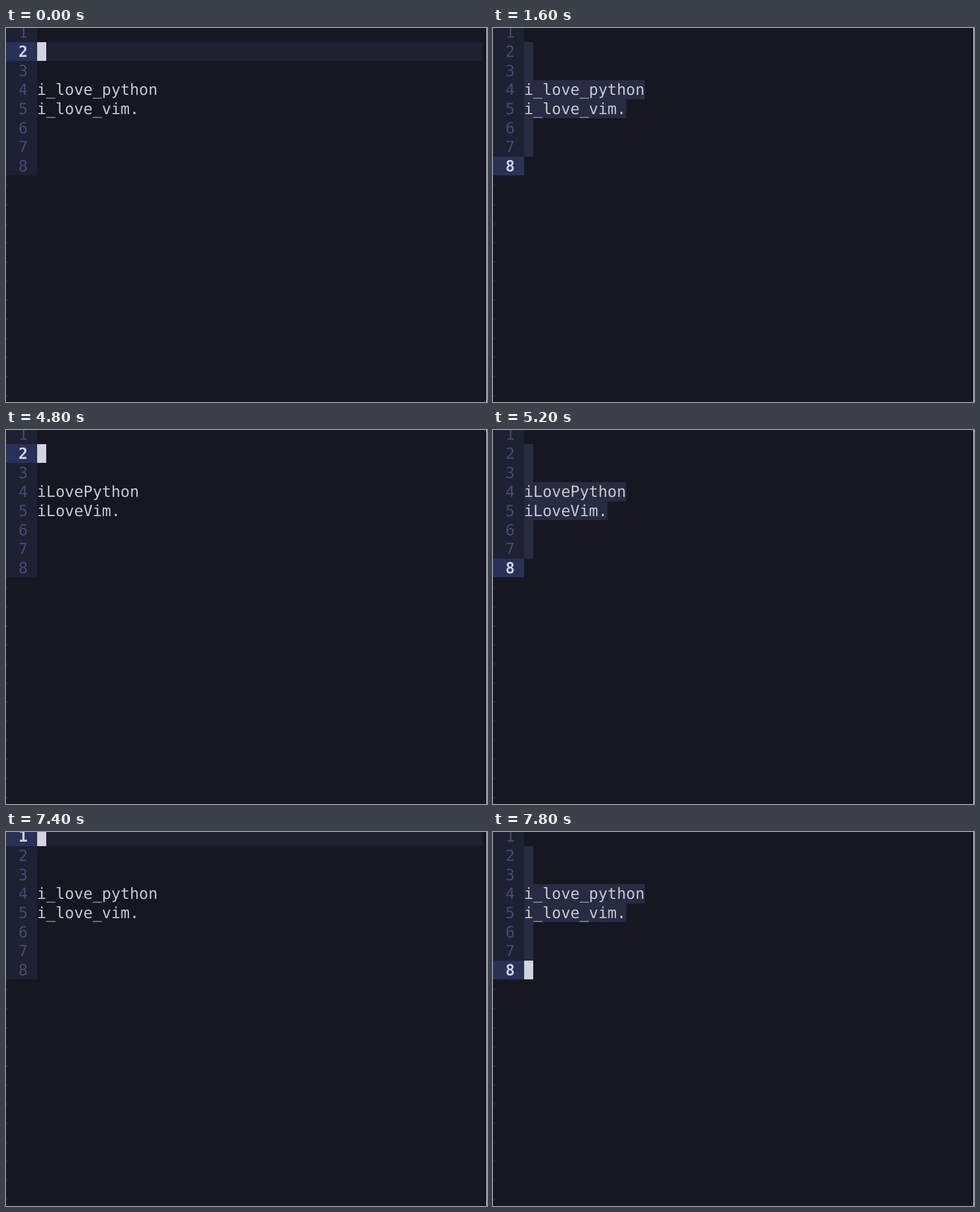
These frames come from a looping animation (849 px wide and 660 px high, 8 s). An HTML page with a canvas:

```html
<!DOCTYPE html>
<html lang="en">
<head>
<meta charset="utf-8">
<title>Editor case toggle</title>
<style>
  html, body { margin: 0; width: 100%; height: 100%; overflow: hidden; background: #161821; }
  canvas { display: block; }
</style>
</head>
<body>
<canvas id="stage" width="849" height="660"></canvas>
<script>
const ctx = document.getElementById('stage').getContext('2d', { alpha: false });
const W = 849, H = 660, LOOP = 8000;
const FONT = '27.2px "DejaVu Sans Mono", monospace';
const LEFT = 54.75, CELL = 16.38, TOP = 24.8, ROW = 33.64, BASE = 26.2;
const LINES = 8, COLS = 48;

const color = {
  bg: '#161821', text: '#c6c8d1', gutter: '#1e2132', number: '#444b71',
  activeGutter: '#2a3158', activeNumber: '#cdd1e6', line: '#1e2132',
  visual: '#272c42', cursor: '#d2d4de', filler: '#242940', edge: '#ffffff'
};

const snake = { 4: 'i_love_python', 5: 'i_love_vim.' };
const camel = { 4: 'iLovePython', 5: 'iLoveVim.' };

// Each step: start time, mode, cursor row, text, cursor shown
const steps = [
  [0, 'normal', 2, snake, true],
  [1000, 'visual', 2, snake, true],
  [1200, 'visual', 8, snake, true],
  [1600, 'visual', 8, snake, false],
  [4100, 'normal', 2, camel, true],
  [4800, 'visual', 2, camel, true],
  [4900, 'visual', 8, camel, true],
  [5200, 'visual', 8, camel, false],
  [7000, 'normal', 2, snake, true],
  [7400, 'normal', 1, snake, true],
  [7500, 'normal', 2, snake, true],
  [7600, 'visual', 2, snake, true],
  [7800, 'visual', 8, snake, true]
];

const rowY = row => TOP + (row - 2) * ROW;
const colX = col => LEFT + col * CELL;

function fillCells(row, from, to, fill) {
  const x = Math.round(colX(from)), y = Math.round(rowY(row));
  ctx.fillStyle = fill;
  ctx.fillRect(x, y, Math.round(colX(to)) - x, Math.round(rowY(row + 1)) - y);
}

function print(str, row, col, fill, bold) {
  ctx.font = (bold ? 'bold ' : '') + FONT;
  ctx.fillStyle = fill;
  ctx.fillText(str, colX(col), rowY(row) + BASE);
}

function draw([, mode, cursorRow, text, cursorOn]) {
  ctx.fillStyle = color.bg;
  ctx.fillRect(0, 0, W, H);

  for (let row = 1; row <= LINES; row++) {
    const active = row === cursorRow;
    const str = text[row] || '';
    fillCells(row, -4, 0, active ? color.activeGutter : color.gutter);
    if (active && mode === 'normal') fillCells(row, 0, COLS, color.line);
    if (mode === 'visual' && row >= 2 && row < cursorRow) {
      fillCells(row, 0, Math.max(1, str.length), color.visual);
    }
    if (active && cursorOn) fillCells(row, 0, 1, color.cursor);
    print(String(row), row, -2, active ? color.activeNumber : color.number, active);
    print(str, row, 0, color.text);
  }

  for (let row = LINES + 1; rowY(row) < H; row++) print('~', row, -4, color.filler);

  ctx.fillStyle = color.edge;
  ctx.fillRect(W - 1, 0, 1, H);
}

ctx.textBaseline = 'alphabetic';
ctx.textRendering = 'geometricPrecision';

const start = performance.now();
function frame() {
  const t = (performance.now() - start) % LOOP;
  draw(steps.findLast(step => step[0] <= t));
  requestAnimationFrame(frame);
}
frame();
</script>
</body>
</html>
```
